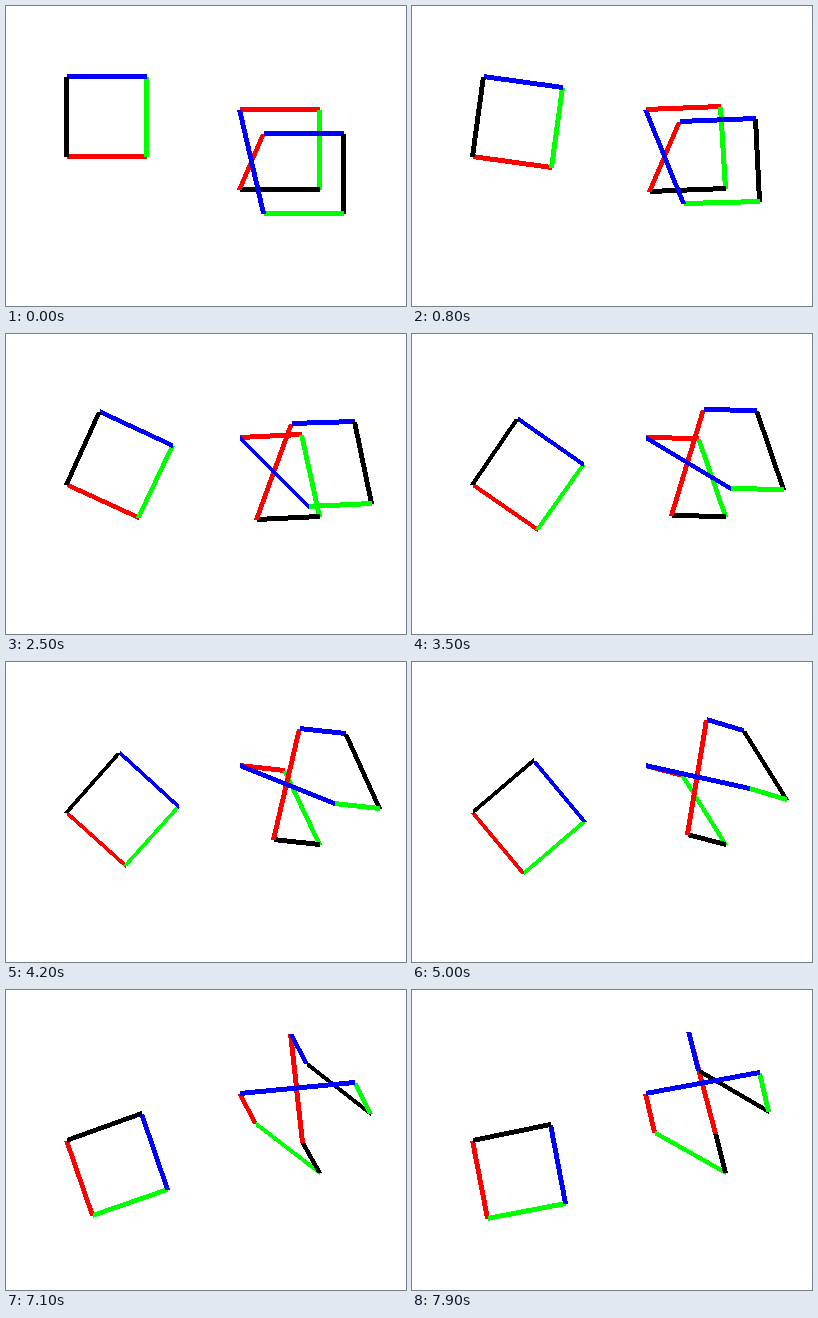
Write an HTML page that moves like this. It is 400 px wide and 300 px high and loops after 8000 ms.

```html
<!DOCTYPE html>
<html lang="en">
<head>
<meta charset="utf-8">
<title>Rotating square and cube path</title>
<style>
  html, body { margin: 0; width: 100%; height: 100%; overflow: hidden; background: #fff; }
  svg { display: block; width: 400px; height: 300px; }
</style>
</head>
<body>
<svg id="stage" viewBox="0 0 400 300" shape-rendering="crispEdges"></svg>
<script>
const SIDE = 80, WIDTH = 5, DEPTH = 0.3;
const STEP_MS = 100, STEPS = 80;
const AXIS_TILT = 1e-6;
const RED = '#f00', GREEN = '#0f0', BLUE = '#00f', BLACK = '#000';
const stage = document.getElementById('stage');

const square = {
  origin: [60, 150],
  corners: [[0, 0], [1, 0], [1, -1], [0, -1]],
  edges: makeEdges([RED, GREEN, BLUE, BLACK]),
  project: turnFlat
};
const cube = {
  origin: [233, 103],
  corners: [[0, 0, 0], [1, 0, 0], [1, 1, 0], [0, 1, 0],
            [0, 0, 1], [1, 0, 1], [1, 1, 1], [0, 1, 1]],
  edges: makeEdges([RED, GREEN, BLACK, RED, BLUE, BLACK, GREEN, BLUE]),
  project: turnSolid
};

function makeEdges(colors) {
  return colors.map(fill => {
    const edge = document.createElementNS('http://www.w3.org/2000/svg', 'polygon');
    edge.setAttribute('fill', fill);
    return stage.appendChild(edge);
  });
}

function turnFlat([x, y], angle) {
  const c = Math.cos(angle), s = Math.sin(angle);
  return [x * c - y * s, x * s + y * c];
}

// Rotate about the face diagonal (1, 1, 0), then project obliquely.
// The axis tips very slightly upwards as it turns.
function turnSolid([x, y, z], angle) {
  const turn = angle * Math.SQRT2;
  const c = Math.cos(turn), s = Math.sin(turn) / Math.SQRT2;
  const along = (x + y) / 2 * (1 - c);
  const tilt = AXIS_TILT * angle * (x + y);
  const depth = DEPTH * (z * c + (y - x) * s);
  return [x * c + z * s + along + depth + tilt, y * c - z * s + along + depth - tilt];
}

// Thickness is measured across the minor axis, so slanted lines look thinner.
function placeEdge(edge, [x1, y1], [x2, y2]) {
  const flat = Math.abs(x2 - x1) >= Math.abs(y2 - y1);
  const dx = flat ? 0 : WIDTH / 2, dy = flat ? WIDTH / 2 : 0;
  edge.setAttribute('points', [
    x1 - dx, y1 - dy, x2 - dx, y2 - dy,
    x2 + dx, y2 + dy, x1 + dx, y1 + dy
  ].join(' '));
}

// Corners sit at the centres of whole pixels.
function drawShape({ origin, corners, edges, project }, angle) {
  const points = corners.map(corner =>
    project(corner, angle).map((v, i) => Math.floor(origin[i] + SIDE * v) + 0.5));
  edges.forEach((edge, i) => placeEdge(edge, points[i], points[(i + 1) % points.length]));
}

function render(time) {
  const step = Math.floor(time / STEP_MS) % STEPS;
  const angle = step * Math.PI / 180;
  drawShape(square, angle);
  drawShape(cube, angle);
}

const start = performance.now();
function tick() {
  render(performance.now() - start);
  requestAnimationFrame(tick);
}
tick();
</script>
</body>
</html>
```
